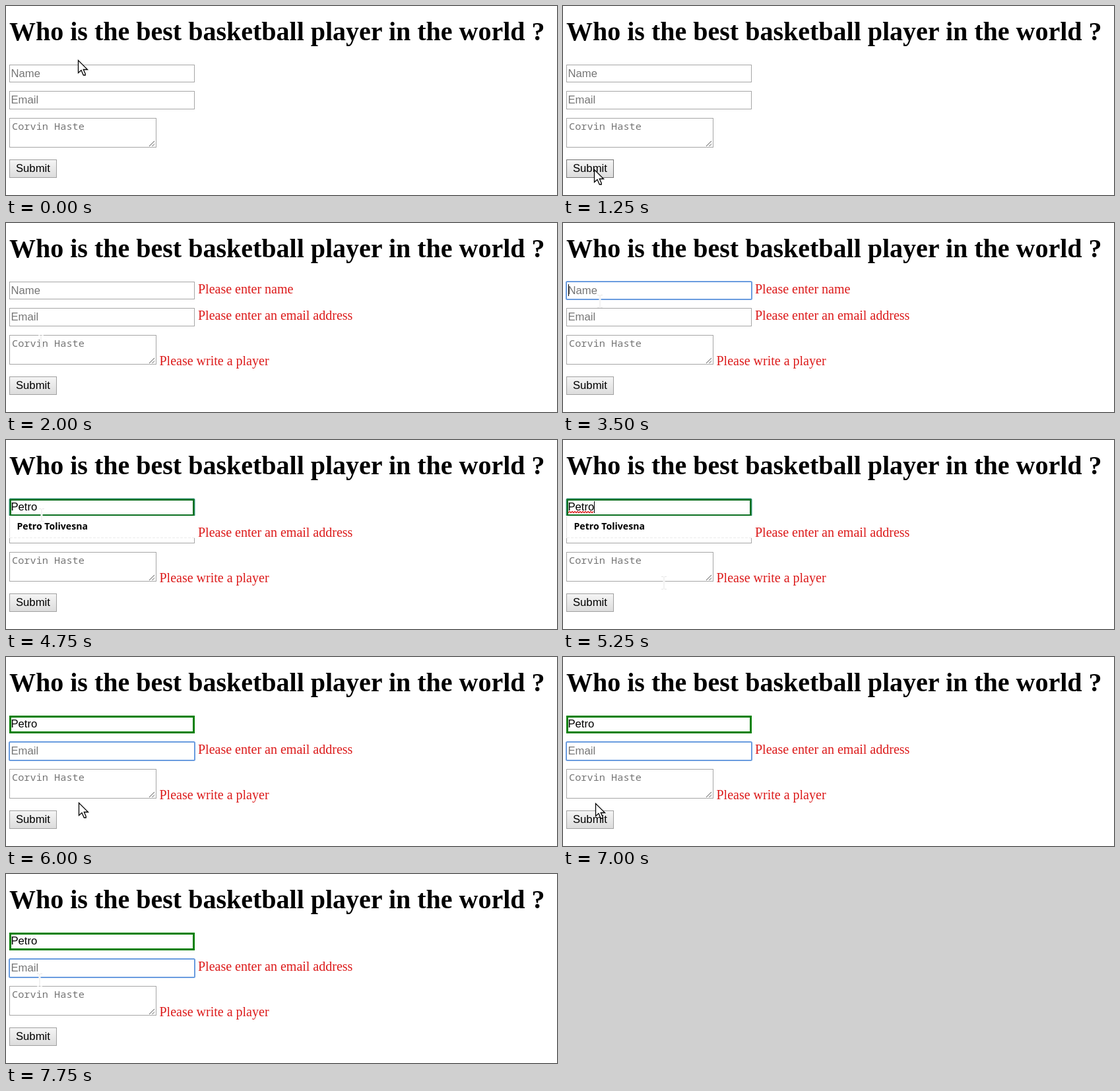
An HTML page that plays this animation: 835x287 px, repeating every 8000 ms.

```html
<!DOCTYPE html>
<html lang="en">
<head>
<meta charset="utf-8">
<title>Player form</title>
<style>
  html, body { margin: 0; width: 100%; height: 100%; overflow: hidden; background: #fff; }
  svg { display: block; width: 835px; height: 287px; }
  text { white-space: pre; }
  .title { font: bold 40px "Liberation Serif", "Times New Roman", serif; }
  .error { font: 20px "Liberation Serif", "Times New Roman", serif; fill: #dc1a1a; }
  .field { font: 16.67px "Liberation Sans", Arial, sans-serif; }
  .mono { font: 15.28px "Noto Sans Mono", monospace; }
  .hint { fill: #757575; }
  .option { font: bold 14.1px "Open Sans", sans-serif; }
  .box { fill: #fff; stroke: #a6a6a6; }
  .ring { fill: none; stroke: #6a9cdf; stroke-width: 2; }
  .valid { fill: none; stroke: #008000; stroke-width: 3; }
  .valid.focus { stroke: #0b7020; }
  .ring.over { stroke: #3c9c8c; stroke-width: 1; }
</style>
</head>
<body>
<svg viewBox="0 0 835 287">
  <defs>
    <linearGradient id="face" x2="0" y2="1">
      <stop offset="0" stop-color="#f5f5f5"/>
      <stop offset="1" stop-color="#dcdcdc"/>
    </linearGradient>
  </defs>
  <rect width="835" height="287" fill="#fff"/>
  <text class="title" x="5" y="52">Who is the best basketball player in the world ?</text>

  <rect class="box" x="5.5" y="89.5" width="280" height="26"/>
  <rect class="box" x="5.5" y="129.5" width="280" height="27"/>
  <rect class="box" x="5.5" y="170.5" width="222" height="44"/>
  <path d="M217 213l8-8M221.5 213l3.500-3.500" stroke="#555" fill="none"/>
  <rect id="button" x="5.5" y="233.5" width="71" height="27" fill="url(#face)"/>
  <text class="field" x="15" y="252">Submit</text>

  <rect id="valid" class="valid" x="6.5" y="90.5" width="278" height="24"/>
  <rect id="nameRing" class="ring" x="5" y="89" width="281" height="27" rx="1.5"/>
  <rect id="emailRing" class="ring" x="5" y="129" width="281" height="28" rx="1.5"/>

  <text id="nameHint" class="field hint" x="7.5" y="107.5">Name</text>
  <text class="field hint" x="7.5" y="148">Email</text>
  <text class="mono hint" x="9" y="188">Corvin Haste</text>
  <text id="typed" class="field" x="7.5" y="107"></text>
  <path id="squiggle" fill="none" stroke="#e02020" stroke-width="1.3"/>

  <text id="nameError" class="error" x="291" y="107">Please enter name</text>
  <g id="otherErrors">
    <text class="error" x="291" y="147">Please enter an email address</text>
    <text class="error" x="232.5" y="216">Please write a player</text>
  </g>

  <g id="popup">
    <rect x="4" y="115" width="283" height="34" fill="#fff"/>
    <path d="M5.5 116V148.5" stroke="#dcdcdc"/>
    <path d="M6 148.5H286" stroke="#ececec" stroke-dasharray="4 2"/>
    <text class="option" x="16.5" y="136">Petro Tolivesna</text>
  </g>

  <rect id="caret" width="1" height="18"/>
  <path id="arrow" d="M.5.5V19.5L5 15.5L8.3 23H11.2V21L8.3 14.5H14.5Z" fill="#fff" stroke="#000" stroke-width="1.3"/>
  <g id="beam" fill="none">
    <path d="M0-9V9" stroke="#fff" stroke-width="3"/>
    <path d="M-4-9.5H-1L0-8.5L1-9.5H4M0-8.5V8.5M-4 9.5H-1L0 8.5L1 9.5H4" stroke="#e6e6e6"/>
  </g>
</svg>
<script>
const LOOP = 8000;
const $ = id => document.getElementById(id);
const show = (id, on) => $(id).setAttribute('visibility', on ? 'visible' : 'hidden');
const within = (t, ...spans) => spans.some(([a, b]) => t >= a && t < b);

const pointer = [
  [0, 109, 82, 'arrow'],
  [250, 107, 108, 'beam'],
  [500, 97, 160, 'arrow'],
  [750, 88, 220, 'arrow'],
  [1000, 70, 262, 'arrow'],
  [1250, 47, 248, 'arrow'],
  [2000, 53, 180, 'beam'],
  [2250, 56, 119, 'beam'],
  [4750, 54, 114, 'beam'],
  [5000, 110, 180, 'beam'],
  [5250, 153, 217, 'beam'],
  [5500, 135, 180, 'beam'],
  [5750, 115, 148, 'beam'],
  [6000, 110, 221, 'arrow'],
  [6250, 72, 252, 'arrow'],
  [6500, 48, 247, 'arrow'],
  [7000, 49, 222, 'arrow'],
  [7250, 50, 190, 'beam'],
  [7500, 51, 170, 'beam'],
  [7750, 51, 161, 'beam']
];
const typing = [[0, ''], [3750, 'P'], [4000, 'Pet'], [4250, 'Petro']];
const latest = (list, t) => list.filter(row => row[0] <= t).pop();

let wave = 'M8 110.5';
for (let x = 10; x <= 46; x += 2) wave += `L${x} ${x % 4 ? 108.5 : 110.5}`;
$('squiggle').setAttribute('d', wave);

function render(t) {
  const word = latest(typing, t)[1];
  const onEmail = t >= 5750;
  $('typed').textContent = word;
  show('nameHint', !word);
  show('valid', word);
  $('valid').classList.toggle('focus', !onEmail);
  $('nameRing').classList.toggle('over', !!word);
  show('nameError', t >= 1500 && !word);
  show('otherErrors', t >= 1500);
  show('nameRing', within(t, [2250, 5750]));
  show('emailRing', onEmail);
  show('popup', within(t, [3750, 5750]));
  show('squiggle', within(t, [5000, 5750]));

  const caret = $('caret');
  caret.setAttribute('x', onEmail || !word ? 8 : Math.round(7.5 + $('typed').getComputedTextLength()));
  caret.setAttribute('y', onEmail ? 134 : 93);
  show('caret', within(t, [2250, 3000], [3500, 4750], [5000, 6000], [6500, 7000], [7250, 7750]));

  const [, x, y, shape] = latest(pointer, t);
  for (const id of ['arrow', 'beam']) show(id, id === shape);
  $(shape).setAttribute('transform', `translate(${x} ${y})`);
  const hover = x > 5 && x < 77 && y > 233 && y < 261;
  $('button').setAttribute('stroke', hover ? '#747474' : '#a0a0a0');
}

const start = performance.now();
function tick() {
  render((performance.now() - start) % LOOP);
  requestAnimationFrame(tick);
}
tick();
</script>
</body>
</html>
```
